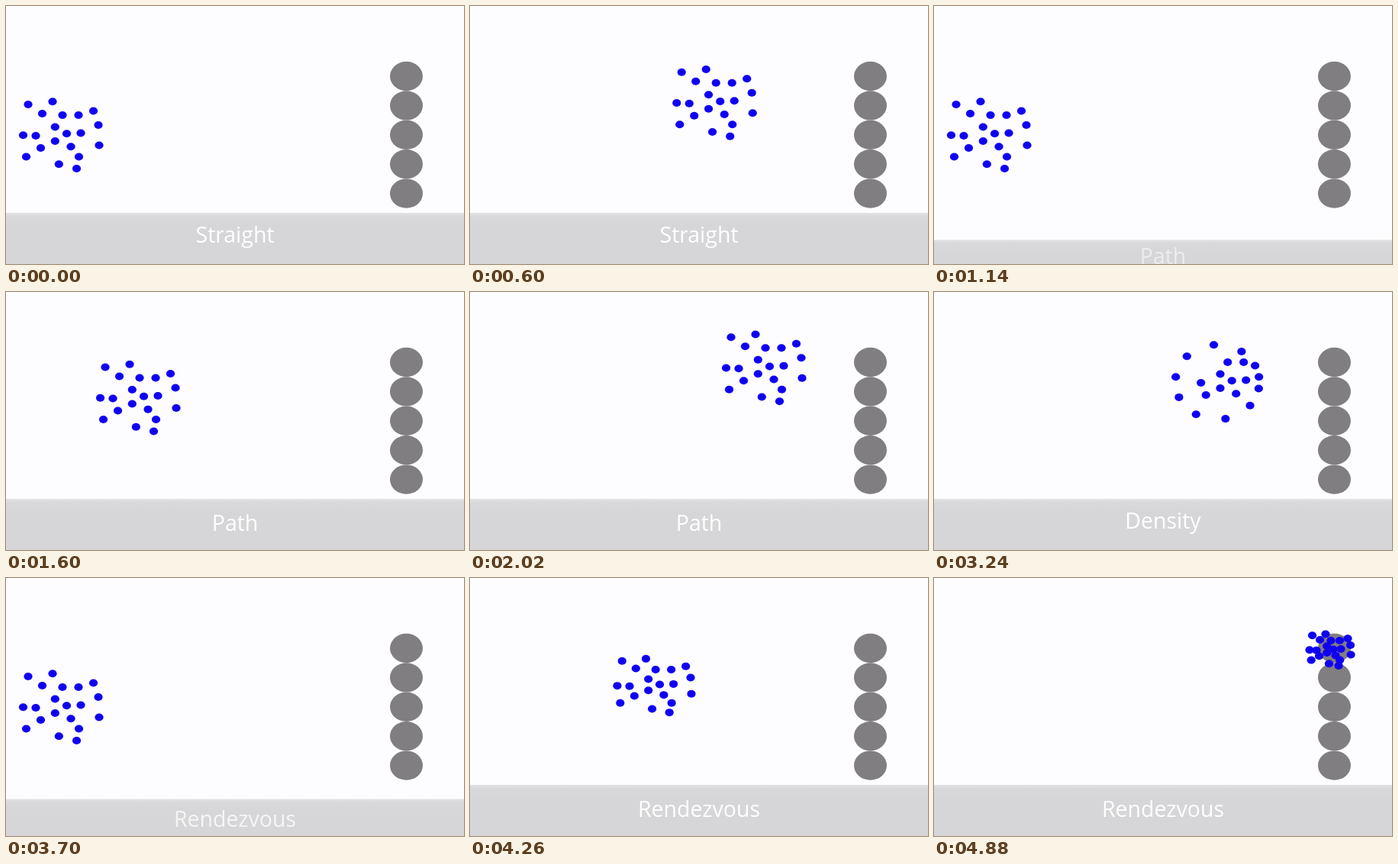
Write an HTML page that moves like this. It is 600 px wide and 338 px high and loops after 4900 ms.

```html
<!DOCTYPE html>
<html lang="en">
<head>
<meta charset="utf-8">
<title>Swarm motion</title>
<style>
  html, body { margin: 0; width: 100%; height: 100%; overflow: hidden; background: #fdfcfe; }
  svg { display: block; width: 100vw; height: 100vh; }
  text { font: 28.5px "Open Sans", "Noto Sans", sans-serif; fill: #fff; text-anchor: middle; }
</style>
</head>
<body>
<svg id="stage" viewBox="0 0 600 338" preserveAspectRatio="none">
  <defs>
    <linearGradient id="shade" x1="0" y1="0" x2="0" y2="1">
      <stop offset="0" stop-color="#e2e1e3"/>
      <stop offset="0.07" stop-color="#d9d8da"/>
      <stop offset="0.25" stop-color="#d6d5d7"/>
      <stop offset="1" stop-color="#d6d5d7"/>
    </linearGradient>
  </defs>
  <rect width="600" height="338" fill="#fdfcfe"/>
  <g id="targets" fill="#807e80"></g>
  <rect id="band" y="271" width="600" height="67" fill="url(#shade)"/>
  <text id="label" x="300"></text>
  <g id="dots" fill="#1000f0"></g>
</svg>
<script>
const LOOP = 4900, RISE = 150, BAND = 67;
const HOME = [72, 169], GOAL = [524, 92];
const RING = 11, DENSE_AT = 0.66;

// Swarm around its centre: the outer ring clockwise from the right, then the inside
const swarm = [
  [49, -13], [50, 13.5], [23.5, 28.5], [20.5, 44], [-2.7, 38.3], [-45.5, 28.5],
  [-49.5, 0.3], [-43, -40], [-24.5, -28], [-11, -43.7], [42.5, -31.5],
  [23, -26], [2, -26], [26, -2.5], [7.5, -1.7], [-7.7, -10.5], [-7.7, 8],
  [13, 15.3], [-26.5, 17], [-33, 1]
];

// Outer dots spread round an oval, closer together in front; inner dots move forward
function dense([x, y], i) {
  if (i >= RING) return [x + 11.5, y];
  const a = i / RING * 2 * Math.PI;
  const b = a - 0.14 - 0.24 * Math.sin(a) - 0.14 * Math.sin(2 * a);
  return [55 * Math.cos(b), 49 * Math.sin(b)];
}
const gather = ([x, y]) => [0.54 * x - 4, 0.47 * y + 2];
const keep = p => p;

const linear = s => s;
const easeOut = s => 1 - (1 - s) ** 2;
const still = () => [0, 0];
const early = s => Array(2).fill((s / DENSE_AT) ** 0.58);
const late = s => [s ** 3, s];

const scenes = [
  { name: "Straight", cut: -RISE, start: 40, dur: 1040, base: 309.5, climb: linear, shape: keep, blend: still },
  { name: "Path", cut: 1100, start: 1310, dur: 1082, base: 313, climb: easeOut, shape: keep, blend: still },
  { name: "Density", cut: 2400, start: 2597, dur: 1020, base: 309.5, climb: linear, shape: dense, blend: early },
  { name: "Rendezvous", cut: 3630, start: 3846, dur: 1040, base: 313, climb: linear, shape: gather, blend: late }
];

const clamp = v => Math.min(1, Math.max(0, v));
const mix = (a, b, k) => a + (b - a) * k;
const ease = u => (u + u * u * (3 - 2 * u)) / 2;
const $ = id => document.getElementById(id);

function ellipse(parent, cx, cy, rx, ry) {
  const el = document.createElementNS("http://www.w3.org/2000/svg", "ellipse");
  const attrs = { cx, cy, rx, ry };
  for (const k in attrs) el.setAttribute(k, attrs[k]);
  parent.appendChild(el);
  return el;
}

for (let i = 0; i < 5; i++) ellipse($("targets"), 524.5, 92 + i * 38.4, 21.5, 19.2);
const dots = swarm.map(() => ellipse($("dots"), 0, 0, 5.6, 5));
const band = $("band"), label = $("label");

function draw(t) {
  const scene = scenes.filter(c => t >= c.cut).pop();
  const s = ease(clamp((t - scene.start) / scene.dur));
  const cx = mix(HOME[0], GOAL[0], s);
  const cy = mix(HOME[1], GOAL[1], scene.climb(s));
  const [kx, ky] = scene.blend(s);
  swarm.forEach((p, i) => {
    const q = scene.shape(p, i);
    dots[i].setAttribute("cx", cx + mix(p[0], q[0], kx));
    dots[i].setAttribute("cy", cy + mix(p[1], q[1], ky));
  });

  const left = (1 - clamp((t - scene.cut) / RISE)) ** 2;
  band.setAttribute("y", 271 + left * BAND);
  label.textContent = scene.name;
  label.setAttribute("y", scene.base + left * 48);
  label.setAttribute("opacity", 1 - left * 0.85);
}

const t0 = performance.now();
function tick() {
  draw((performance.now() - t0) % LOOP);
  requestAnimationFrame(tick);
}
tick();
</script>
</body>
</html>
```
